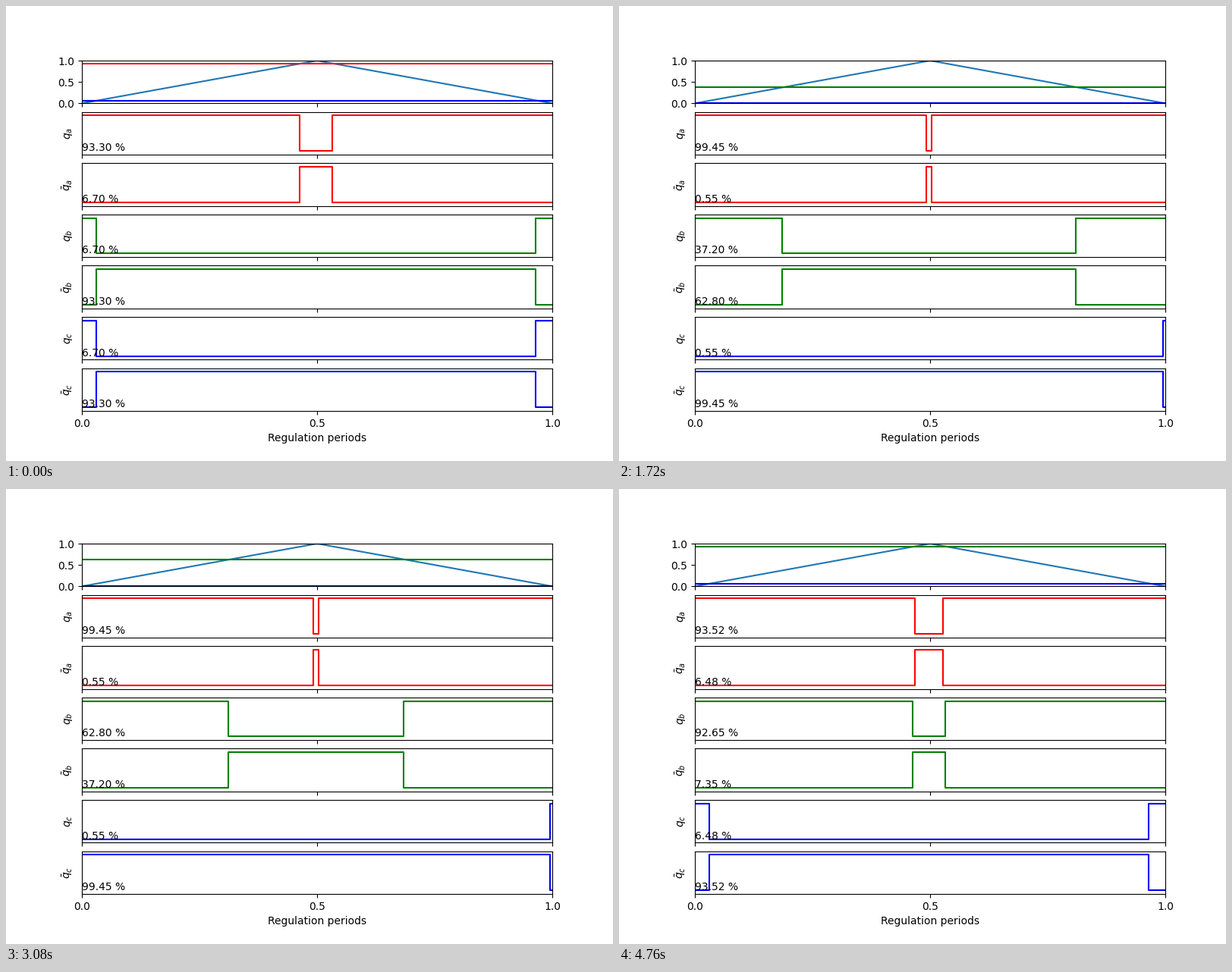
Recreate the animation shown at these times as a matplotlib script. Size 800 px wide and 600 px high, loop 4.8 s.

```python
import numpy as np
import matplotlib.pyplot as plt
from matplotlib.animation import FuncAnimation

FRAMES = 120
INTERVAL = 40
PHASES = "abc"
COLORS = ("red", "green", "blue")

x = np.linspace(0, 1, 200)
carrier = 1 - np.abs(2 * x - 1)


def duties(angle):
    """Phase duty cycles of a space vector at full linear modulation."""
    v = np.cos(np.radians(angle - np.array([0, 120, 240]))) / np.sqrt(3)
    return 0.5 + v - (v.max() + v.min()) / 2


fig, axes = plt.subplots(7, 1, sharex=True, figsize=(8, 6), dpi=100)
top, rows = axes[0], axes[1:]

top.plot(x, carrier)
top.set(xlim=(0, 1), ylim=(0, 1), xticks=[0, 0.5, 1], yticks=[0, 0.5, 1])
levels = [top.plot([0, 1], [0, 0], color=c)[0] for c in COLORS]

gates, labels = [], []
for i, ax in enumerate(rows):
    phase = i // 2
    name = r"\bar{q}" if i % 2 else "q"
    gates.append(ax.step(x, 0 * x, color=COLORS[phase])[0])
    labels.append(ax.text(0, 0, ""))
    ax.set(ylim=(-0.1, 1.1), yticks=[])
    ax.set_ylabel(f"${name}_{PHASES[phase]}$", labelpad=7.5)
rows[-1].set_xlabel("Regulation periods")


def update(frame):
    for phase, duty in enumerate(duties(frame * 60 / FRAMES)):
        levels[phase].set_ydata([duty, duty])
        on = (duty >= carrier).astype(float)
        pair = ((on, duty), (1 - on, 1 - duty))
        for i, (signal, share) in enumerate(pair, start=2 * phase):
            gates[i].set_ydata(signal)
            labels[i].set_text(f"{abs(share) * 100:.2f} %")
    return levels + gates + labels


anim = FuncAnimation(fig, update, frames=FRAMES, interval=INTERVAL,
                     repeat=True, repeat_delay=0)
plt.show()
```
